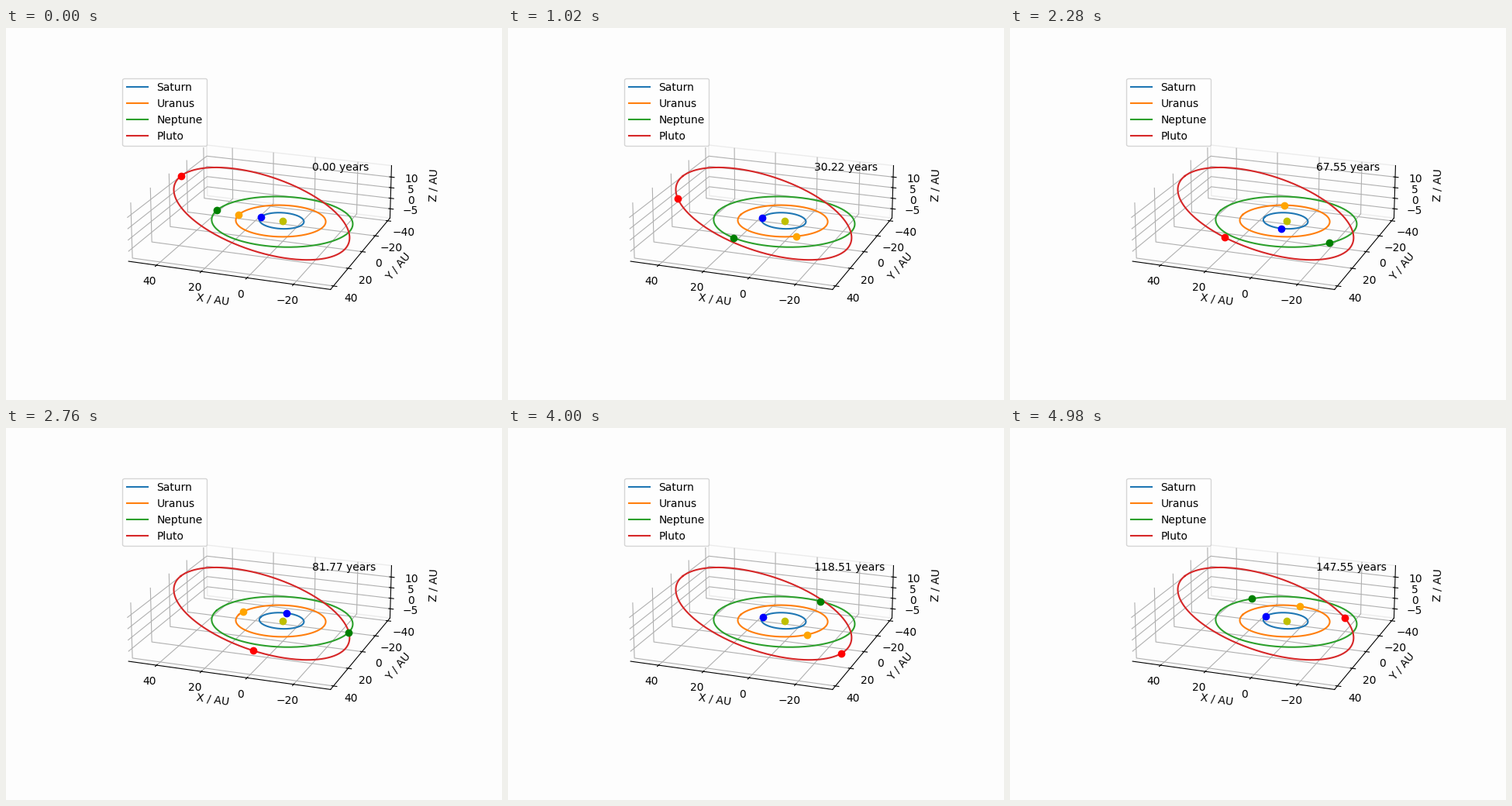
Recreate the animation shown at these times as a matplotlib script. Size 640x480 px, loop 5 s.

```python
import numpy as np
import matplotlib.pyplot as plt
from matplotlib.animation import FuncAnimation

FRAMES = 250
BG = "#fdfdfd"

# name, semi-major axis / AU, eccentricity, inclination / deg, period / years, dot colour
PLANETS = [
    ("Saturn", 9.577, 0.06, 2.49, 29.628, "blue"),
    ("Uranus", 19.293, 0.05, 0.77, 84.747, "orange"),
    ("Neptune", 30.246, 0.01, 1.77, 166.344, "green"),
    ("Pluto", 39.509, 0.25, 17.5, 248.348, "red"),
]
YEARS_PER_FRAME = 5 * PLANETS[0][4] / FRAMES


def position(a, ecc, tilt, anomaly):
    """Point on a tilted ellipse; the anomaly is counted from aphelion."""
    x = a * (np.cos(anomaly) + ecc)
    y = a * np.sqrt(1 - ecc**2) * np.sin(anomaly)
    beta = np.radians(tilt)
    return np.array([x * np.cos(beta), y, x * np.sin(beta)])


def solve_kepler(mean, ecc):
    anomaly = mean
    for _ in range(40):
        anomaly = mean - ecc * np.sin(anomaly)
    return anomaly


def padded(lo, hi, margin):
    pad = margin * (hi - lo)
    return lo - pad, hi + pad


fig = plt.figure(figsize=(6.4, 4.8), dpi=100, facecolor=BG)
ax = fig.add_subplot(projection="3d", facecolor=BG)

turn = np.linspace(0, 2 * np.pi, 361)
orbits = [position(a, ecc, tilt, turn) for _, a, ecc, tilt, _, _ in PLANETS]
for planet, orbit in zip(PLANETS, orbits):
    ax.plot(*orbit, label=planet[0])

ax.plot([0], [0], [0], "o", color="y")
dots = [ax.plot([0], [0], [0], "o", color=planet[5])[0] for planet in PLANETS]
clock = ax.text(0, -40, 10, "")

# Equal scale on all axes, with a small margin around the orbits
points = np.hstack(orbits)
limits = []
for lo, hi, margin in zip(points.min(axis=1), points.max(axis=1), (0.05, 0.05, 0)):
    limits.append(padded(*padded(lo, hi, margin), 1 / 48))

ax.set(xticks=range(-20, 41, 20), yticks=range(-40, 41, 20), zticks=range(-5, 11, 5),
       xlabel="X / AU", ylabel="Y / AU", zlabel="Z / AU")
ax.set(xlim=limits[0], ylim=limits[1], zlim=limits[2])
ax.set_box_aspect([hi - lo for lo, hi in limits])
ax.view_init(elev=20, azim=110)
ax.legend(loc="upper left")

for axis, edge in ((ax.xaxis, "none"), (ax.yaxis, "#ececec"), (ax.zaxis, "none")):
    axis.pane.set(alpha=None, facecolor="none", edgecolor=edge)


def update(n):
    t = n * YEARS_PER_FRAME
    for dot, (_, a, ecc, tilt, period, _) in zip(dots, PLANETS):
        anomaly = solve_kepler(2 * np.pi * t / period, ecc)
        dot.set_data_3d(*position(a, ecc, tilt, anomaly).reshape(3, 1))
    clock.set_text(f"{t:.2f} years")
    return [*dots, clock]


anim = FuncAnimation(fig, update, frames=FRAMES, interval=20,
                     repeat=True, repeat_delay=0, blit=False)
plt.show()
```
